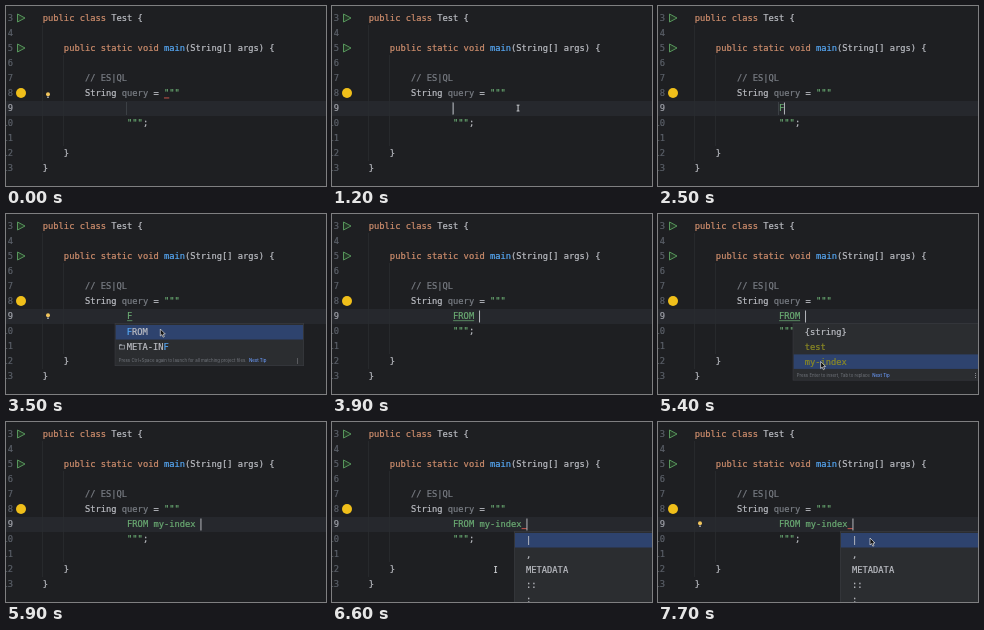
An HTML page with a canvas for the animation above (8 s loop, 320x180 px).

```html
<!DOCTYPE html>
<html lang="en">
<head>
<meta charset="utf-8">
<title>Code completion</title>
<style>
  html, body { margin: 0; width: 100%; height: 100%; overflow: hidden; background: #1e1f22; }
  canvas { display: block; width: 320px; height: 180px; }
</style>
</head>
<body>
<canvas id="stage" width="320" height="180"></canvas>
<script>
const ctx = document.getElementById('stage').getContext('2d');
const LOOP = 8000, LEFT = 36.8, COL = 5.268, ROW = 15;
const MONO = '8.75px "DejaVu Sans Mono", monospace';
const C = {
  bg: '#1e1f22', line: '#26282d', guide: '#2a2c30', popup: '#2b2d30', edge: '#393b40',
  pick: '#2e436e', text: '#bcbec4', key: '#cf8e6d', str: '#6aab73', fn: '#56a8f5',
  dim: '#7a7e85', num: '#5b6069', index: '#8c8a24', red: '#d6584f', run: '#57965c',
  bulb: '#f2c55c'
};

const rowY = n => 12 + (n - 3) * ROW;      // middle of a text row
const colX = n => LEFT + n * COL;

function rect(x, y, w, h, color) {
  ctx.fillStyle = color;
  ctx.fillRect(x, y, w, h);
}

function circle(x, y, r, color) {
  ctx.fillStyle = color;
  ctx.beginPath();
  ctx.arc(x, y, r, 0, 7);
  ctx.fill();
}

function shape(points, fill, stroke, width) {
  ctx.beginPath();
  points.forEach(([x, y]) => ctx.lineTo(x, y));
  ctx.closePath();
  ctx.fillStyle = fill;
  ctx.fill();
  ctx.strokeStyle = stroke;
  ctx.lineWidth = width;
  ctx.stroke();
}

// Monospaced text on an exact grid; parts alternate text and colour.
function mono(x, y, ...parts) {
  ctx.font = MONO;
  ctx.lineWidth = 0.2;
  for (let i = 0; i < parts.length; i += 2) {
    ctx.fillStyle = ctx.strokeStyle = parts[i + 1];
    for (const ch of parts[i]) {
      ctx.fillText(ch, x, y + 3);
      ctx.strokeText(ch, x, y + 3);
      x += COL;
    }
  }
}

const code = (row, col, ...parts) => mono(colX(col), rowY(row), ...parts);

function editor() {
  rect(0, 0, 320, 180, C.bg);
  rect(0, 95, 320, 15, C.line);
  rect(36, 19, 0.8, 136, C.guide);
  rect(57, 49, 0.8, 91, C.guide);
  for (let n = 3; n <= 13; n++) {
    const label = String(n);
    mono(7 - label.length * COL, rowY(n), label, n === 9 ? '#a1a3ab' : C.num);
  }
  for (const y of [12, 42])
    shape([[11.5, y - 4], [19, y], [11.5, y + 4]], '#253627', C.run, 1);
  circle(15, 87, 5, '#f0bf1a');
  code(3, 0, 'public class ', C.key, 'Test {', C.text);
  code(5, 4, 'public static void ', C.key, 'main', C.fn, '(String[] args) {', C.text);
  code(7, 8, '// ES|QL', C.dim);
  code(8, 8, 'String ', C.text, 'query', C.dim, ' = ', C.text, '"""', C.str);
  code(10, 16, '"""', C.str, ';', C.text);
  code(12, 4, '}', C.text);
  code(13, 0, '}', C.text);
}

function bulb(y) {
  circle(42, y - 0.7, 2, C.bulb);
  rect(41, y + 1.6, 2, 1.2, '#a8adb5');
}

function popup(x, right, bottom, rows, picked, tip) {
  rect(x, 109, right - x, bottom - 109, C.edge);
  rect(x + 0.6, 109.6, right - x - 1.2, bottom - 110.2, C.popup);
  rect(x + 1, 111 + picked * 14.7, right - x - 2, 14.5, C.pick);
  rows.forEach((parts, i) => mono(x + 12, 118.3 + i * 14.8, ...parts));
  if (!tip) return;
  const y = bottom - 5;
  ctx.font = '4.35px Inter, sans-serif';
  ctx.fillStyle = '#73777e';
  ctx.fillText(tip, x + 4, y + 1.4);
  const next = x + 4 + ctx.measureText(tip + '  ').width;
  ctx.font = '500 4.35px Inter, sans-serif';
  ctx.fillStyle = '#6b9bfa';
  ctx.fillText('Next Tip', next, y + 1.4);
  for (let d = -2; d <= 2; d += 2) rect(right - 7, y + d - 0.4, 0.8, 0.8, C.text);
}

function completion(t) {
  if (t >= 2600 && t < 3600) {
    popup(108.7, 298, 152, [['F', C.fn, 'ROM', C.text], ['META-IN', C.text, 'F', C.fn]], 0,
      'Press Ctrl+Space again to launch for all matching project files.');
    ctx.strokeStyle = '#a8adb5';
    ctx.lineWidth = 0.7;
    ctx.strokeRect(113.5, 131.2, 5, 3.8);
    rect(113.5, 130.3, 2.2, 1, '#a8adb5');
  } else if (t >= 4200 && t < 5600) {
    popup(134.7, 324, 166.5, [['{string}', C.text], ['test', C.index], ['my-index', C.index]],
      t < 5300 ? 0 : 2, 'Press Enter to insert, Tab to replace');
  } else if (t >= 6600) {
    popup(182, 324, 190, ['|', ',', 'METADATA', '::', ';'].map(s => [s, C.text]), 0);
  }
}

// Typed text by time
const TYPED = [[0, ''], [2100, 'F'], [3600, 'FROM'], [3800, 'FROM '],
  [5600, 'FROM my-index'], [5900, 'FROM my-index ']];

function query(t) {
  const typed = TYPED.filter(([at]) => at <= t).pop()[1];
  if (t < 2600) rect(120, 96, 0.8, 13, '#43464c');
  code(9, 16, typed, C.str);
  if (t < 600) rect(colX(23), 91.5, COL, 0.9, C.red);
  if (t >= 2700 && t < 5900) rect(colX(16), 106.4, COL * Math.min(typed.length, 4), 0.7, C.str);
  if (t >= 6300) rect(colX(29), 106.2, COL, 0.9, C.red);
  const hidden = t < 1200 || (t >= 1700 && t < 2100) || (t >= 3200 && t < 3600);
  if (!hidden) rect(colX(16 + typed.length) - 0.4, 96.5, 1, 12, '#b4b6bc');
}

// Pointer stops: time, x, y
const PATH = [[600, 288, 114], [1200, 185, 102], [2600, 185, 102], [3200, 154.3, 115],
  [4200, 154.3, 115], [4600, 161.5, 124], [5000, 161.5, 130], [5400, 162.6, 147.5],
  [6600, 162.6, 147.5], [7400, 209, 119], [7700, 212, 116]];

function place(t) {
  const i = PATH.findIndex(p => p[0] > t);
  if (i < 0) return PATH[PATH.length - 1].slice(1);
  const [t0, x0, y0] = PATH[i - 1], [t1, x1, y1] = PATH[i];
  let k = (t - t0) / (t1 - t0);
  k = k * k * (3 - 2 * k);
  return [x0 + (x1 - x0) * k, y0 + (y1 - y0) * k];
}

function pointer(t) {
  const within = (a, b) => t >= a && t < b;
  if (within(0, 600) || within(2100, 2600) || within(3800, 4200) || within(5900, 6300)) return;
  const [x, y] = place(t);
  const arrow = within(2600, 3600) || within(4200, 5600) || t >= 6700;
  if (arrow) {
    const outline = [[0, 0], [0, 7], [1.6, 5.6], [2.8, 8.2], [4, 7.6], [2.9, 5.1], [5, 5]];
    shape(outline.map(([a, b]) => [x + a, y + b]), '#111', '#e0e0e0', 0.7);
  } else {
    rect(x + 0.6, y - 3, 0.9, 6, '#dfe1e5');
    for (const e of [-3.3, 2.6]) rect(x - 0.4, y + e, 2.9, 0.8, '#dfe1e5');
  }
}

function draw(t) {
  editor();
  if (t < 600) bulb(89);
  if ((t >= 3000 && t < 3600) || t >= 7200) bulb(102);
  query(t);
  completion(t);
  pointer(t);
}

const start = performance.now();
function tick() {
  const t = (performance.now() - start) % LOOP;
  draw(Math.floor(t / 100) * 100);
  requestAnimationFrame(tick);
}
tick();
</script>
</body>
</html>
```
